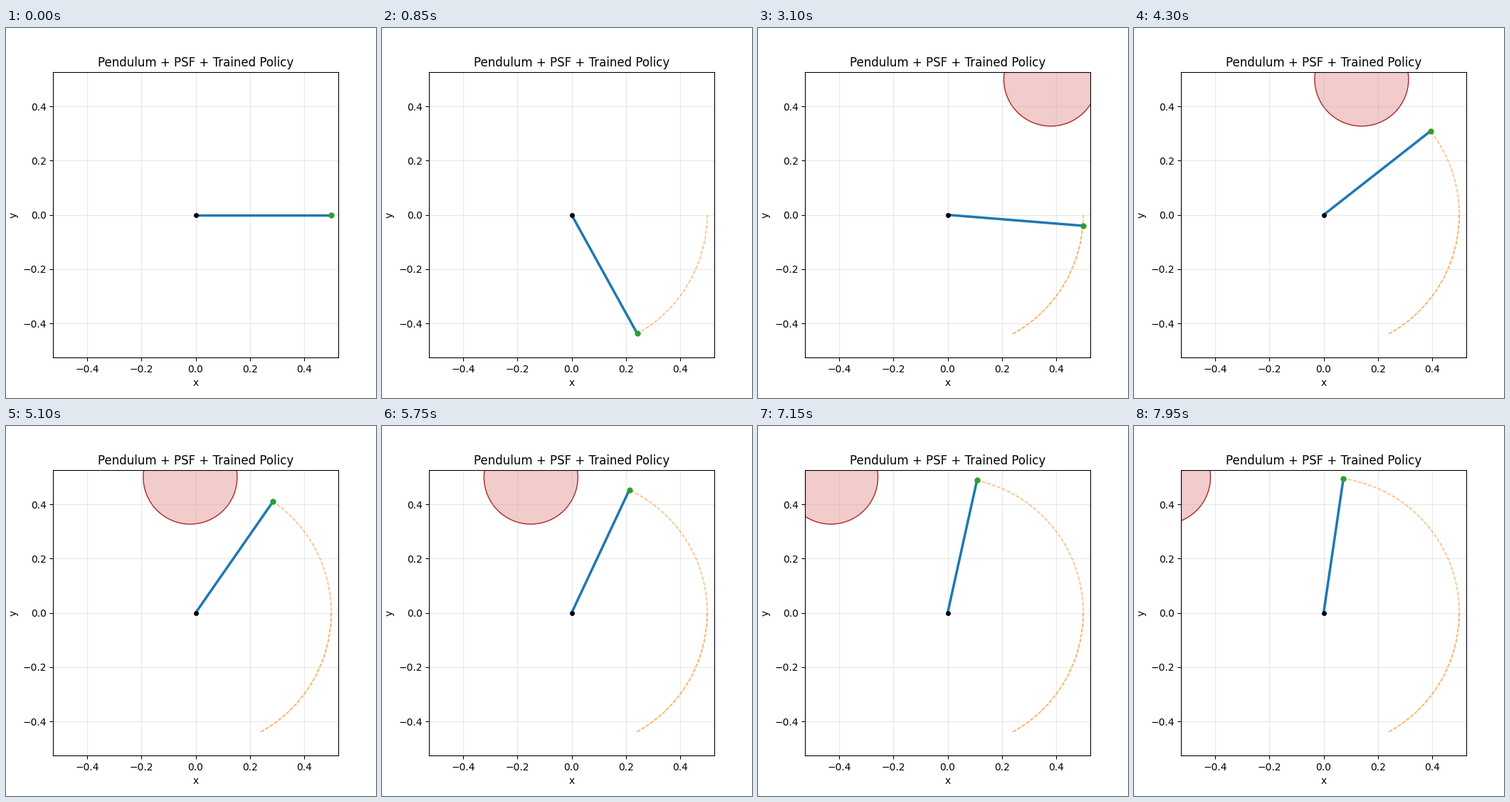
Animation, 520 px wide and 520 px high, one loop 8 s. Source, as a matplotlib script:

```python
import numpy as np
import matplotlib.pyplot as plt
from matplotlib.animation import FuncAnimation
from matplotlib.patches import Circle

FRAMES, STEP = 160, 50
LENGTH = 0.5
FALL_END, RISE_START, RISE_JOIN = 1.05, 1.45, 2.65


def fall(t):
    """Critically damped drop towards the lower rest angle, in degrees."""
    x = 7.6 * t
    return -61.8 * (1 - (1 + x) * np.exp(-x))


def approach(t):
    """Exponential approach to upright."""
    return 90 - 94.6 * np.exp(-0.5 * (t - 3.1))


def swing_up(t):
    """Cubic from rest that joins the approach curve smoothly."""
    h = RISE_JOIN - RISE_START
    u = (t - RISE_START) / h
    start, end = fall(FALL_END), approach(RISE_JOIN)
    speed = 0.5 * (90 - end)
    s = u * u * (3 - 2 * u)
    return start + (end - start) * s + h * speed * u * u * (u - 1)


def angle(t):
    if t < RISE_START:
        return fall(min(t, FALL_END))
    return swing_up(t) if t < RISE_JOIN else approach(t)


times = np.arange(FRAMES) * STEP / 1000
theta = np.radians([angle(t) for t in times])
xs, ys = LENGTH * np.cos(theta), LENGTH * np.sin(theta)

fig, ax = plt.subplots(figsize=(5.2, 5.2), dpi=100)
ax.set_aspect("equal")
ax.set_xlim(-1.05 * LENGTH, 1.05 * LENGTH)
ax.set_ylim(-1.05 * LENGTH, 1.05 * LENGTH)
ax.set_xticks(np.arange(-2, 3) * 0.2)
ax.set_yticks(np.arange(-2, 3) * 0.2)
ax.grid(True, alpha=0.3)
ax.set_title("Pendulum + PSF + Trained Policy")
ax.set_xlabel("x")
ax.set_ylabel("y")

obstacle = ax.add_patch(Circle((1, 0.5), 0.173, fc="#f1cccb", ec="#ae2527", lw=1))
trail, = ax.plot([], [], "--", color="tab:orange", lw=1, alpha=0.6)
rod, = ax.plot([], [], color="tab:blue", lw=2.5)
ax.plot([0], [0], "o", color="black", ms=4)
tip, = ax.plot([], [], "o", color="tab:green", ms=5)


def draw(i):
    obstacle.center = (1 - 0.2 * times[i], 0.5)
    trail.set_data(xs[:i + 1], ys[:i + 1])
    rod.set_data([0, xs[i]], [0, ys[i]])
    tip.set_data([xs[i]], [ys[i]])
    return obstacle, trail, rod, tip


anim = FuncAnimation(fig, draw, frames=FRAMES, interval=STEP, repeat=True)
plt.show()
```
